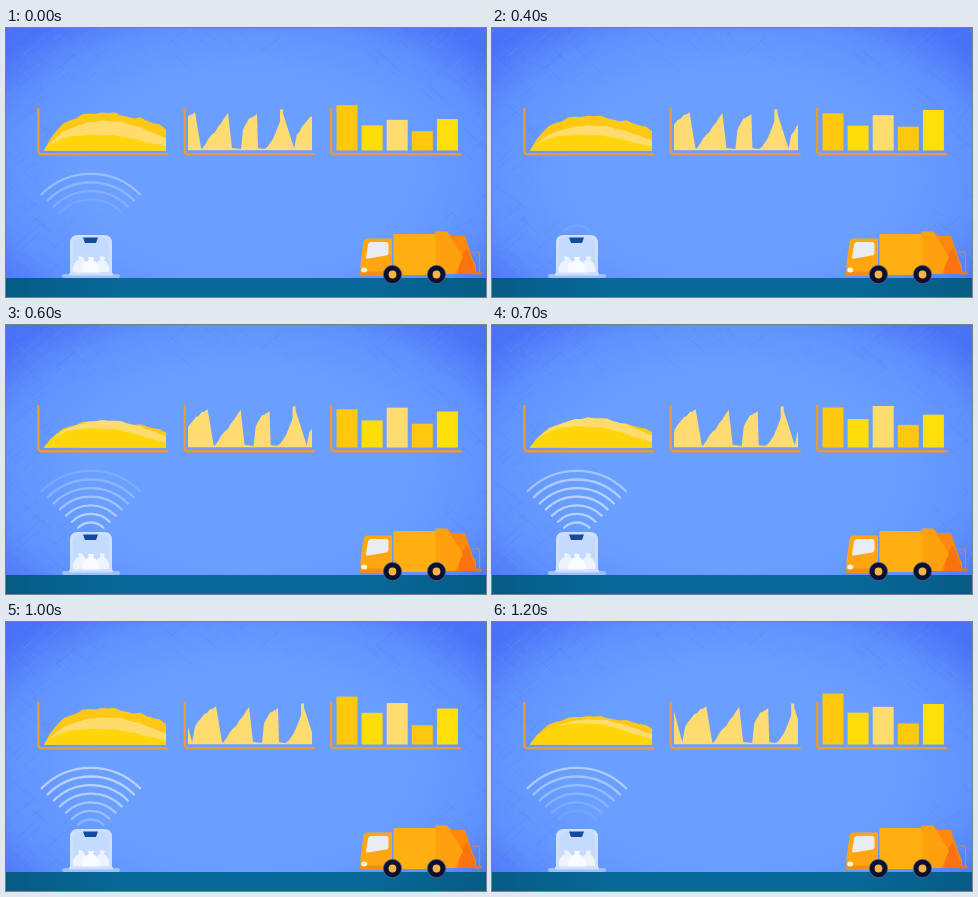
Write an HTML page that moves like this. It is 480 by 269 pixels and loops after 1300 ms.

```html
<!DOCTYPE html>
<html lang="en">
<head>
<meta charset="utf-8">
<title>Smart waste collection</title>
<style>
  html, body { margin: 0; width: 100%; height: 100%; overflow: hidden; background: #6a9fff; }
  svg { display: block; width: 100vw; height: 100vh; }
  #axes { fill: none; stroke: #ec9a38; stroke-width: 2.4; stroke-linecap: round; }
  #arcs { fill: none; stroke: #e2edff; stroke-width: 2.3; stroke-linecap: round; }
</style>
</head>
<body>
<svg viewBox="0 0 480 269" preserveAspectRatio="none">
  <defs>
    <radialGradient id="sky" gradientUnits="userSpaceOnUse" r="1"
      gradientTransform="translate(240 145) scale(310 190)" cx="0" cy="0">
      <stop offset=".52" stop-color="#6a9fff"/>
      <stop offset=".8" stop-color="#5f91fe"/>
      <stop offset="1" stop-color="#4a72f7"/>
    </radialGradient>
    <linearGradient id="road">
      <stop offset="0" stop-color="#055b84"/>
      <stop offset=".25" stop-color="#08699a"/>
      <stop offset=".75" stop-color="#08699a"/>
      <stop offset="1" stop-color="#055b84"/>
    </linearGradient>
    <clipPath id="plot"><rect x="182" y="75" width="124" height="47.5"/></clipPath>
  </defs>

  <rect width="480" height="269" fill="url(#sky)"/>
  <g id="brush" fill="none" stroke-width="1.2"></g>
  <rect y="250" width="480" height="19" fill="url(#road)"/>

  <g id="areas"></g>
  <g clip-path="url(#plot)">
    <g id="scroll" fill="#ffdc72">
      <path id="skyline"/>
      <rect x="274" y="81.5" width="3" height="30"/>
    </g>
  </g>
  <g id="bars"></g>
  <g id="axes"></g>
  <g id="arcs"></g>

  <g id="bin">
    <path d="M64 247V215Q64 207 72 207H98Q106 207 106 215V247Z" fill="#cfe0ff"/>
    <path d="M67 247V217Q67 210 74 210H96Q103 210 103 217V247Z" fill="#c5daff"/>
    <path d="M77 209.5H92L90 215H79Z" fill="#124b9d"/>
    <g fill="#eef4ff">
      <path d="M67 244Q66 234 73 232L72 228L77 229L79 233Q83 237 81 245H69Z"/>
      <path d="M89 245Q87 235 94 232L94 228L99 229L98 232Q104 235 103 244Z"/>
      <path d="M76 245Q75 235 83 232L82 229L88 229L87 232Q95 236 93 245Z" fill="#f8fbff"/>
    </g>
    <rect x="56" y="246" width="58" height="4" rx="2" fill="#9dc0fd"/>
    <rect x="63" y="244.5" width="44" height="3" rx="1.5" fill="#cfe0ff"/>
  </g>

  <g id="truck">
    <path d="M466 224H471Q473.5 224 473.5 227V244" fill="none" stroke="#c98b55" stroke-width="1.2"/>
    <path d="M439 205H443L446 208H459L467 232L470 238V246H439Z" fill="#ff880e"/>
    <path d="M455 228L461 220L469 240V246H452Z" fill="#f9740f"/>
    <rect x="387.5" y="206" width="46" height="41" rx="1.5" fill="#ffb010"/>
    <path d="M429.5 203.5H441L457 229L449 246H429.5Z" fill="#ffa10e"/>
    <path d="M354.5 247V235L357.5 214Q358.2 210.5 362 210.5H386V247Z" fill="#ffa612"/>
    <path d="M360 229L362 216.5Q362.5 214 365 214H380Q382.5 214 382.5 217V225Q382.5 227 380 227.5L362 230.5Q360 231 360 229Z" fill="#e9ecf2"/>
    <rect x="354" y="243.5" width="24" height="4.5" rx="1.5" fill="#f58d14"/>
    <ellipse cx="358.2" cy="242" rx="3" ry="2.5" fill="#fff4d6"/>
    <rect x="466" y="243.5" width="10" height="3" rx="1" fill="#dd7a27"/>
  </g>
  <g id="wheels"></g>
</svg>
<script>
const NS = 'http://www.w3.org/2000/svg';
const LOOP = 1300, STEP = 100, FLOOR = 122.5;
const byId = id => document.getElementById(id);
const clamp = v => Math.max(0, Math.min(1, v));
const swing = (t, mid, amp, peak, period) => mid + amp * Math.cos(2 * Math.PI * (t - peak) / period);

function add(parent, tag, attrs) {
  const el = document.createElementNS(NS, tag);
  for (const k in attrs) el.setAttribute(k, attrs[k]);
  return byId(parent).appendChild(el);
}

let seed = 7;
const rnd = () => (seed = (seed * 16807) % 2147483647) / 2147483647;
const jitter = size => (rnd() - .5) * size;

// Crossed brush strokes, denser towards the edges
for (let g = 0; g < 16; g++) {
  let d = '';
  for (let n = 0; n < 90; n++) {
    const x = rnd() * 480, y = rnd() * 250;
    const edge = Math.hypot((x - 240) / 250, (y - 145) / 150);
    if (edge < .75 + rnd() * .35) continue;
    const len = 6 + rnd() * 18, dir = n % 2 ? 1 : -1;
    d += `M${x} ${y}l${len} ${dir * len * .85}`;
  }
  add('brush', 'path', { d, stroke: g % 2 ? '#7fabff' : '#4069e8', 'stroke-opacity': .09 });
}

for (let x = 32.3; x < 400; x += 146.4)
  add('axes', 'path', { d: `M${x} 81v41.5q0 3.8 4 3.8h125` });

for (const x of [386.5, 430.5]) {
  add('wheels', 'circle', { cx: x, cy: 246.5, r: 9.2, fill: '#0b1030', stroke: '#5c6f9c', 'stroke-width': .7 });
  add('wheels', 'circle', { cx: x, cy: 246.5, r: 3.9, fill: '#f5b348' });
}

// Ragged hills: span is the arc of the sine, skew moves the summit
const hills = [
  { fill: '#ffc814', span: 2.53, skew: .67, height: t => swing(t, 38 - t * .008, 6.5, 200, 800) },
  { fill: '#ffdc6c', span: 2.7, skew: .78, height: t => swing(t, 28, 3, 100, 700) },
  { fill: '#ffd60a', span: 2.91, skew: .69, height: t => swing(t, 18.5, 3, 700, 500) }
];
for (const h of hills) {
  h.el = add('areas', 'path', { fill: h.fill });
  h.profile = Array.from({ length: 20 }, (_, i) =>
    i && Math.sin(h.span * (i / 19) ** h.skew) + jitter(.09));
}
function hillPath(h, t) {
  const top = h.profile.map((p, i) => `${38 + i * 122 / 19} ${FLOOR - p * h.height(t)}`);
  return `M${top.join('L')}V${FLOOR}H38Z`;
}

// Towers that climb in a bent line and drop steeply
const towers = [
  { from: 138, crest: 156, to: 165, bend: 1 },
  { from: 165, crest: 189, to: 195, bend: .35 },
  { from: 196, crest: 222, to: 226, bend: 1 },
  { from: 235, crest: 251, to: 252, bend: .3 },
  { from: 257, crest: 277, to: 288, bend: 1.7 },
  { from: 288, crest: 310, to: 316, bend: .5 }
];
let skyline = `M130 ${FLOOR}V121`;
for (const { from, crest, to, bend } of towers) {
  for (let i = 0; i <= 8; i++) {
    const u = i / 8;
    skyline += `L${from + (crest - from) * u} ${121 - 36 * u ** bend + (i ? jitter(3) : 0)}`;
  }
  skyline += `L${to} 120`;
}
byId('skyline').setAttribute('d', `${skyline}V${FLOOR}Z`);

const bars = [
  { fill: '#ffc80c', top: t => swing(t, 78.5, 7, 450, 1600) },
  { fill: '#ffdd0a', top: t => swing(t, 94.5, 4, 220, 1800) },
  { fill: '#ffdc70', top: t => swing(t, 86, 6, 50, 1600) },
  { fill: '#ffc80c', top: t => swing(t, 100.7, 2.5, 0, 1000) },
  { fill: '#ffdf0a', top: t => swing(t, 86.5, 4.5, 0, 800) }
];
bars.forEach((b, i) => b.el = add('bars', 'rect', { x: 330.5 + i * 25.1, width: 21, fill: b.fill }));

// Signal arcs, innermost first
const arcs = Array.from({ length: 7 }, (_, i) => {
  const r = 18 + i * 8.6, s = r * Math.SQRT1_2;
  return add('arcs', 'path', { d: `M${84.8 - s} ${215.5 - s}a${r} ${r} 0 0 1 ${2 * s} 0` });
});
function arcAlpha(i, t) {
  const rise = clamp((t - 370 - 30 * i) / 200);
  const fade = u => 1 - clamp((u - 790 - 60 * i) / 400);
  return .65 * Math.max(rise * fade(t), fade(t + LOOP));
}

function draw(t) {
  for (const h of hills) h.el.setAttribute('d', hillPath(h, t));
  byId('scroll').setAttribute('transform', `translate(${t * .021} 0)`);
  for (const b of bars) {
    const y = b.top(t);
    b.el.setAttribute('y', y);
    b.el.setAttribute('height', FLOOR - y);
  }
  arcs.forEach((a, i) => a.setAttribute('opacity', arcAlpha(i, t)));
}

function tick() {
  draw(Math.floor(performance.now() % LOOP / STEP) * STEP);
  requestAnimationFrame(tick);
}
tick();
</script>
</body>
</html>
```
